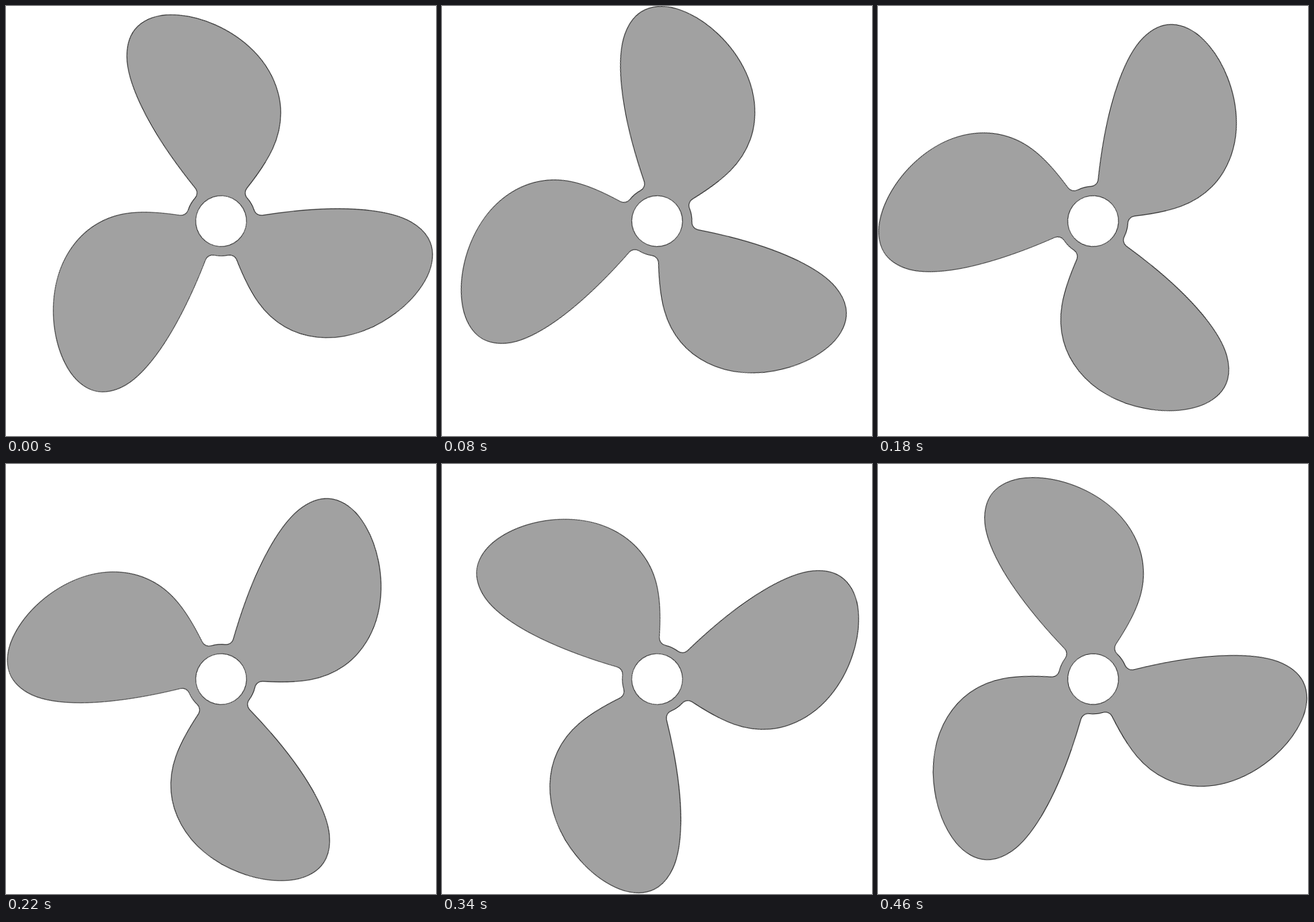
Write an HTML page without scripts that moves like this. It is 748 px wide and 748 px high and loops after 480 ms.

```html
<!DOCTYPE html>
<html lang="en">
<head>
<meta charset="utf-8">
<title>Spinning propeller</title>
<style>
  html, body { margin: 0; width: 100%; height: 100%; overflow: hidden; background: #fff; }
  svg { display: block; width: 100vw; height: 100vh; }
  .metal { fill: #a1a1a1; }
  .line { stroke: #000; stroke-width: 1; }
  .hole { fill: #fff; }
  /* Threefold symmetry: a third of a turn closes the loop. */
  .rotor { animation: spin 480ms steps(24, end) infinite; }
  @keyframes spin {
    from { transform: rotate(-30deg); }
    to { transform: rotate(90deg); }
  }
</style>
</head>
<body>
<svg viewBox="0 0 748 748">
  <defs>
    <!-- One blade with its root fillets and the hub arc to the next blade -->
    <path id="blade" d="M-40.3 -45.2
      A13 13 0 0 1 -56.9 -44.6
      C-109.7 -86.6 -146 -103.8 -188 -103.8
      C-227 -103.8 -266.2 -86.4 -296.6 -56
      C-334.6 -18 -359 38 -359 87
      C-359 111.3 -351.5 132.5 -338.3 145.7
      C-326.6 157.4 -308 164 -287 164
      C-265 164 -236.5 155.8 -203.9 140.6
      C-170.5 125 -118.6 94.4 -56.9 44.6
      A13 13 0 0 1 -40.3 45.2
      A60.5 60.5 0 0 0 -19 57.5"/>
  </defs>
  <g transform="translate(374.2 374.2)">
    <g class="rotor">
      <circle class="metal" r="60.5"/>
      <g class="metal line">
        <use href="#blade"/>
        <use href="#blade" transform="rotate(120)"/>
        <use href="#blade" transform="rotate(240)"/>
      </g>
      <circle class="hole line" r="44.2"/>
    </g>
  </g>
</svg>
</body>
</html>
```
